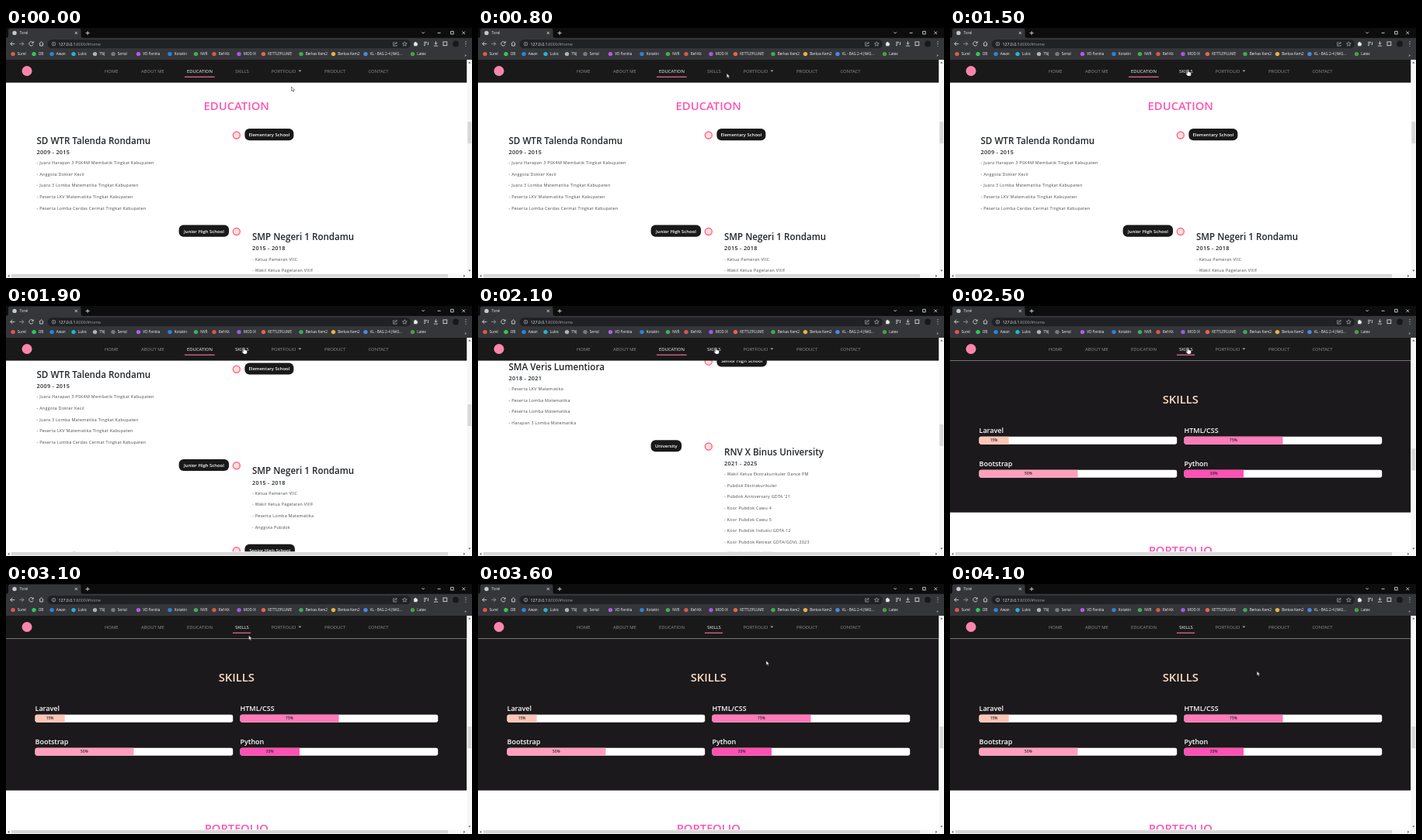
An HTML page that plays this animation: 600x323 px, repeating every 4.2 s.

```html
<!DOCTYPE html>
<html lang="id">
<head>
<meta charset="utf-8">
<title>Portfolio</title>
<style>
  html, body { margin: 0; width: 100%; height: 100%; overflow: hidden; background: #fff; }
  svg { display: block; width: 600px; height: 323px; font-family: "Open Sans", "Noto Sans", sans-serif; }
  text { white-space: pre; }
  .title { font-size: 14.8px; font-weight: 600; text-anchor: middle; }
  .school { font-size: 11.6px; font-weight: 600; fill: #212529; }
  .years { font-size: 7.3px; font-weight: 600; letter-spacing: .3px; fill: #212529; }
  .entry { font-size: 5.4px; letter-spacing: .27px; fill: #45484c; }
  .badge { font-size: 5.9px; font-weight: 600; fill: #fff; text-anchor: middle; }
  .skill { font-size: 9px; font-weight: 600; fill: #fff; }
  .percent { font-size: 4.6px; font-weight: 600; letter-spacing: .2px; fill: #222; text-anchor: middle; }
  .link { font-size: 5.9px; fill: #929292; }
  .mark { font-size: 4.6px; fill: #f4f5f6; }
  .icon { fill: none; stroke: #d5d7da; stroke-width: .9; }
  .dim { stroke: #94979b; }
</style>
</head>
<body>
<svg id="stage" viewBox="0 0 600 323">
  <defs><clipPath id="view"><rect y="41" width="593.5" height="276.5"/></clipPath></defs>

  <rect width="600" height="323" fill="#fff"/>
  <g clip-path="url(#view)"><g id="page"></g></g>

  <g id="nav">
    <rect y="41" width="593.5" height="29.6" fill="#1a191a"/>
    <circle cx="27" cy="55.5" r="6.5" fill="#fb86ab"/>
    <path d="M376.4 54.6h4l-2 2.2z" fill="#a5a5a5"/>
    <rect id="line" y="62.6" height="1.2"/>
  </g>

  <g id="bars">
    <rect x="593.5" y="41" width="6.5" height="282" fill="#f7f7f7"/>
    <rect y="317.5" width="600" height="5.5" fill="#f7f7f7"/>
    <rect x="7" y="318" width="562" height="4.4" fill="#d8d8d8"/>
    <rect id="thumb" x="594.4" y="121.2" width="4.8" height="28" fill="#d8d8d8"/>
    <path d="M595.2 45.4h3.2l-1.6-2zM595.2 312.6h3.2l-1.6 2zM4.3 318.7v3.2l-2-1.6zM589.2 318.7v3.2l2-1.6z" fill="#555"/>
  </g>

  <g id="browser">
    <rect width="600" height="14" fill="#0d0d0e"/>
    <path d="M0 13q3 0 3-3V3q0-2.500 2.500-2.500h88.500q2.500 0 2.500 2.500v7q0 3 3 3z" fill="#35363a"/>
    <rect y="12.800" width="600" height="28.200" fill="#35363a"/>
    <circle cx="11" cy="6.400" r="2.700" fill="#c6c8cb"/>
    <text x="17.500" y="8.200" font-size="4.700" fill="#e8eaed">Torel</text>
    <g class="icon">
      <path d="M88.700 4.800l3.200 3.200m0-3.200l-3.200 3.200M102.600 6.500h5m-2.500-2.500v5"/>
      <path d="M535.500 5.300l1.700 1.700 1.700-1.700M555.600 6.300h4M572.600 4.300h3.600v3.600h-3.600zM587.500 4.500l3.600 3.600m0-3.600l-3.600 3.600"/>
      <path d="M11.300 20.400H5.700m2.600-2.600l-2.600 2.600 2.600 2.600"/>
      <path class="dim" d="M17.300 20.400h5.600m-2.600-2.600l2.600 2.600-2.600 2.600"/>
      <path d="M34.700 18.800a2.700 2.700 0 1 0 .3 2.500M35.200 17.300v2h-2"/>
      <path d="M42.800 20.300l2.700-2.600 2.700 2.600m-4.500-.5v3.200h3.600v-3.200"/>
    </g>
    <rect x="53.500" y="14.900" width="467.500" height="11.400" rx="5.700" fill="#202124"/>
    <g class="icon">
      <circle class="dim" cx="61.500" cy="20.600" r="2.300"/>
      <path class="dim" d="M61.500 20.300v1.600M61.500 19v.6"/>
      <path class="dim" d="M500.300 18.700h-1.600v4.400h4.300v-1.400M500.300 21.600q0-2.500 3-2.500m-1.200-1.400l1.400 1.400-1.400 1.400"/>
      <path class="dim" d="M513.400 17.700l.8 1.900 2.100.2-1.600 1.400.5 2-1.800-1.100-1.800 1.100.5-2-1.600-1.400 2.100-.2z"/>
      <path d="M538 18.400h4M538 20.400h3M538 22.400h2M543.400 18v4.200"/>
      <path d="M553.500 17.300v3.800m-1.700-1.700l1.700 1.700 1.700-1.700M550.900 23.100h5.200"/>
      <rect x="563" y="17.900" width="4.700" height="4.700"/>
    </g>
    <path d="M525.200 18.700h1.200a.9.9 0 0 1 1.800 0h1.200v1.300a.9.9 0 0 1 0 1.800v1.400h-4.200z" fill="#e6e8ea"/>
    <circle cx="579" cy="20.400" r="3.900" fill="#17181b"/>
    <path d="M592 17.600v.1m0 2.700v.1m0 2.700v.1" stroke="#d5d7da" stroke-width="1.100" stroke-linecap="round"/>
    <text x="67.500" y="22.500" font-size="5.200" fill="#f1f3f4">127.0.0.1<tspan fill="#9aa0a6">:8000/#home</tspan></text>
    <text x="590.500" y="36.500" class="mark" font-size="7">»</text>
  </g>

  <g id="cursor" fill="#fff" stroke="#222" stroke-width=".5" stroke-linejoin="round">
    <path id="arrow" d="M0 0v5.600l1.300-1.200.9 2 1-.4-.9-2h1.700z"/>
    <path id="hand" d="M-.7.500q.7-1 1.400 0v2.600q1-.5 1.500.3 1-.3 1.300.5 1-.1 1 .9v1.400q0 1.400-.8 2.400h-3.800q-.9-1.700-2.300-3 0-1 1-.7l.7.500z"/>
  </g>
</svg>

<script>
const $ = id => document.getElementById(id);
const LOOP = 4200, STEP = 100;
const PINK = '#ff55b5', PEACH = '#ffdcc4', DARK = '#1a191a';

function add(parent, tag, attrs, content) {
  const el = document.createElementNS('http://www.w3.org/2000/svg', tag);
  for (const k in attrs) el.setAttribute(k, attrs[k]);
  if (content) el.textContent = content;
  parent.appendChild(el);
  return el;
}
const page = $('page');
const write = (cls, x, y, str, fill) =>
  add(page, 'text', fill ? { class: cls, x, y, fill } : { class: cls, x, y }, str);

// Education timeline, alternating sides
const ROW = 14.6;
const schools = [
  ['Elementary School', 63, 'SD WTR Talenda Rondamu', '2009 - 2015', [
    'Juara Harapan 3 PSK4M Membatik Tingkat Kabupaten', 'Anggota Dokter Kecil',
    'Juara 3 Lomba Matematika Tingkat Kabupaten', 'Peserta LKV Matematika Tingkat Kabupaten',
    'Peserta Lomba Cerdas Cermat Tingkat Kabupaten']],
  ['Junior High School', 64.5, 'SMP Negeri 1 Rondamu', '2015 - 2018', [
    'Ketua Pameran VIIC', 'Wakil Ketua Pagelaran VIIIF',
    'Peserta Lomba Matematika', 'Anggota Pubdok']],
  ['Senior High School', 64.5, 'SMA Veris Lumentiora', '2018 - 2021', [
    'Peserta LKV Matematika', 'Peserta Lomba Matematika',
    'Peserta Lomba Matematika', 'Harapan 3 Lomba Matematika']],
  ['University', 39.5, 'RNV X Binus University', '2021 - 2025', [
    'Wakil Ketua Ekstrakurikuler Dance PM', 'Pubdok Ekstrakurikuler',
    "Pubdok Anniversary GDTA '21", 'Koor Pubdok Cawu 4', 'Koor Pubdok Cawu 5',
    'Koor Pubdok Induksi GDTA 12', 'Koor Pubdok Retreat GDTA/GDVL 2023', 'TOP 10 VARUNA 2023']]
];
write('title', 296.8, 106.2, 'EDUCATION', PINK);
let y = 138;
schools.forEach(([level, width, name, years, entries], i) => {
  const right = i % 2;
  const x = right ? 317 : 39.5;
  const bx = right ? 222.6 : 307.4;
  add(page, 'circle', { cx: 296.8, cy: y + .5, r: 4.5, fill: '#ffe4c4', stroke: '#ff5fae', 'stroke-width': 1.4 });
  add(page, 'rect', { x: bx, y: y - 7.9, width, height: 15.2, rx: 6, fill: DARK });
  write('badge', bx + width / 2, y + 2.1, level);
  write('school', x, y + 11.7, name);
  write('years', x, y + 24.9, years);
  entries.forEach((e, n) => write('entry', x, y + 38.1 + n * ROW, '- ' + e));
  y += 51.5 + ROW * entries.length;
});

// Skills section
const TOP = 673.5;
add(page, 'rect', { x: 0, y: TOP, width: 593.5, height: 195.7, fill: '#1b191b' });
write('title', 296.8, TOP + 55.2, 'SKILLS', PEACH);
[['Laravel', '15%', 38.2, '#ffc6b8'], ['HTML/CSS', '75%', 127, '#ff7ab8'],
 ['Bootstrap', '50%', 127, '#ff9fbd'], ['Python', '30%', 76.5, '#ff50b4']
].forEach(([name, percent, width, fill], i) => {
  const x = i % 2 ? 301.5 : 37.5;
  const by = TOP + 97.7 + (i > 1 ? 43 : 0);
  write('skill', x, by - 4.8, name);
  add(page, 'rect', { x, y: by, width: 254.7, height: 10, rx: 2.4, fill: '#fff' });
  add(page, 'path', { d: `M${x + width} ${by}v10H${x + 2.4}q-2.4 0-2.4-2.4v-5.200q0-2.4 2.4-2.4z`, fill });
  write('percent', x + width / 2, by + 6, percent);
});
write('title', 296.8, TOP + 249.6, 'PORTFOLIO', PINK);

// Navigation and bookmarks
const links = {};
[['HOME', 127], ['ABOUT ME', 174], ['EDUCATION', 233], ['SKILLS', 295],
 ['PORTFOLIO', 341.5], ['PRODUCT', 410], ['CONTACT', 466.5]
].forEach(([name, x]) => links[name] = add($('nav'), 'text', { class: 'link', x, y: 57.7 }, name));

[['Surel', 9, '#e3564a'], ['OB', 36, '#35c759'], ['Awan', 59, '#2a86dc'], ['Lukis', 87, '#21b5d0'],
 ['TNJ', 114.5, '#a9b5b2'], ['Serial', 138, '#77797d'], ['VD Panitia', 170.5, '#b05bea'],
 ['Kotakin', 211, '#2b83d8'], ['NVR', 244.5, '#3fae5c'], ['Ref-Kit', 268, '#d9564f'],
 ['MOD IX', 300, '#a35be0'], ['KETTLEPLUME', 331.5, '#e8664a'], ['Berkas Kem2', 380, '#3fa95a'],
 ['Berkas Kem2', 421.5, '#e5b53a'], ['KL - BAG 2-4 (NAS...', 463, '#4b86ea'], ['Latex', 523.5, '#47a141']
].forEach(([name, x, fill]) => {
  add($('browser'), 'circle', { cx: x, cy: 33.6, r: 2.7, fill });
  add($('browser'), 'text', { class: 'mark', x: x + 5.8, y: 35.3 }, name);
});

// Same curve as cubic-bezier(.42, 0, .58, 1)
function ease(x) {
  if (x <= 0) return 0;
  if (x >= 1) return 1;
  let lo = 0, hi = 1, s;
  for (let i = 0; i < 24; i++) {
    s = (lo + hi) / 2;
    const bx = 1.26 * s * (1 - s) ** 2 + 1.74 * s * s * (1 - s) + s ** 3;
    if (bx < x) lo = s; else hi = s;
  }
  return s * s * (3 - 2 * s);
}

// Pointer stops: time, x, y
const stops = [[0, 367.5, 76], [200, 367.5, 76], [1100, 306, 53.5], [2700, 306, 53.5],
               [3100, 312.6, 66.6], [3900, 395.2, 112.7], [LOOP, 395.2, 112.7]];
function pointer(t) {
  const i = stops.findIndex(s => s[0] > t);
  const [t0, x0, y0] = stops[i - 1], [t1, x1, y1] = stops[i];
  const k = ease((t - t0) / (t1 - t0));
  return [x0 + (x1 - x0) * k, y0 + (y1 - y0) * k];
}

function draw(now) {
  const t = Math.floor(now % LOOP / STEP) * STEP;

  const scroll = (TOP - 71) * ease((t - 1750) / 700);
  page.setAttribute('transform', `translate(0 ${-scroll})`);
  $('thumb').setAttribute('y', 121.2 + scroll / 9.55);

  const [x, y] = pointer(t);
  const hover = x > 290 && x < 317 && y > 46 && y < 66;
  $('cursor').setAttribute('transform', `translate(${x} ${y})`);
  $('hand').style.display = hover ? '' : 'none';
  $('arrow').style.display = hover ? 'none' : '';

  const onSkills = t >= 2300;
  links.EDUCATION.style.fill = t <= 2300 ? '#fff' : '';
  links.SKILLS.style.fill = onSkills || hover ? '#fff' : '';
  const line = $('line');
  line.setAttribute('x', onSkills ? 292 : 230);
  line.setAttribute('width', onSkills ? 23 : 38.7);
  line.setAttribute('fill', t === 2300 ? '#ffdccf' : '#f56a9e');

  requestAnimationFrame(draw);
}
draw(0);
</script>
</body>
</html>
```
